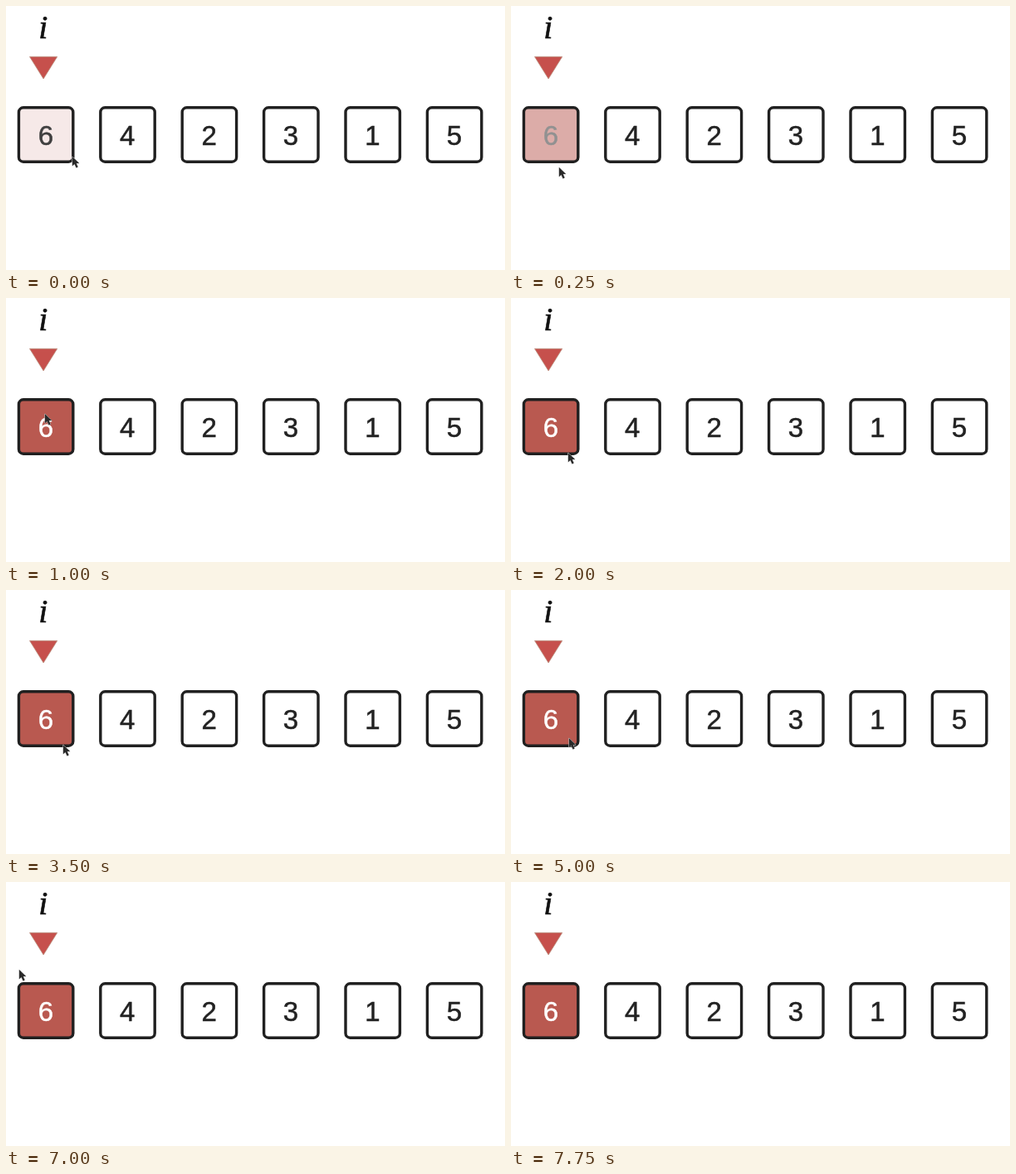
Animation of 601x319 px, one loop 8 s. Source, as an HTML page:

```html
<!DOCTYPE html>
<html lang="en">
<head>
<meta charset="utf-8">
<title>Array scan</title>
<style>
html, body { margin: 0; height: 100%; overflow: hidden; background: #fff; }
svg { display: block; width: 601px; height: 319px; }
text { text-anchor: middle; }
.cell rect { fill: #fff; stroke: #202020; stroke-width: 3.4; }
.cell text { font: 33px "Liberation Sans", Arial, sans-serif; fill: #222; stroke: #222; stroke-width: .5; }
.index { font: italic 40px "Liberation Serif", Times, serif; fill: #111; stroke: #111; stroke-width: .6; }
</style>
</head>
<body>
<svg viewBox="0 0 601 319">
  <text class="index" x="44.7" y="39.3">i</text>
  <path d="M28.5 61.3H61.7L45.1 88Z" fill="#c6504c" stroke="#b98a78" stroke-width=".8"/>
  <g id="cells"></g>
  <path id="cursor" d="M0 0V11.2L2.6 9L4.7 13.4L6.7 12.5L4.8 8.1H8.2Z"
    fill="#2a2a2a" stroke="#ccc" paint-order="stroke"/>
</svg>
<script>
const LOOP = 8000, TICK = 250;
const cells = document.getElementById('cells');
const cursor = document.getElementById('cursor');

cells.innerHTML = [6, 4, 2, 3, 1, 5].map((n, i) =>
  `<g class="cell" transform="translate(${48.1 + 98.4 * i} 155.5)">
    <rect x="-32.7" y="-32.7" width="65.4" height="65.4" rx="5.5"/>
    <text x="-.3" y="12">${n}</text></g>`).join('');
const [box, digit] = cells.firstChild.children;

// Pointer path: time, x, y; it circles the first cell, rests, then leaves
const path = [
  [0, 79, 181], [500, 35, 207], [750, 24, 92], [1250, 68, 186], [4500, 68, 186],
  [5000, 69, 178], [6750, 76, 181], [7000, 15, 105], [7250, -46, 29]
];

const lerp = (a, b, p) => a + (b - a) * p;
const mix = (a, b, p) => `rgb(${a.map((v, i) => Math.round(lerp(v, b[i], p)))})`;

function pointer(t) {
  const next = path.findIndex(k => k[0] > t);
  if (next < 0) return path.at(-1).slice(1);
  const [t0, x0, y0] = path[next - 1], [t1, x1, y1] = path[next];
  const p = (t - t0) / (t1 - t0);
  return [lerp(x0, x1, p), lerp(y0, y1, p)];
}

function draw(now) {
  const t = Math.floor(now % LOOP / TICK) * TICK;
  const p = Math.min(1, 0.13 + t / 500 * 0.74);
  box.style.fill = mix([255, 255, 255], [185, 89, 80], p);
  digit.style.fill = digit.style.stroke = mix([34, 34, 34], [255, 255, 255], p);
  const [x, y] = pointer(t);
  cursor.setAttribute('transform', `translate(${x + 0.9} ${y + 1})`);
}

function loop() {
  draw(performance.now());
  requestAnimationFrame(loop);
}
loop();
</script>
</body>
</html>
```
